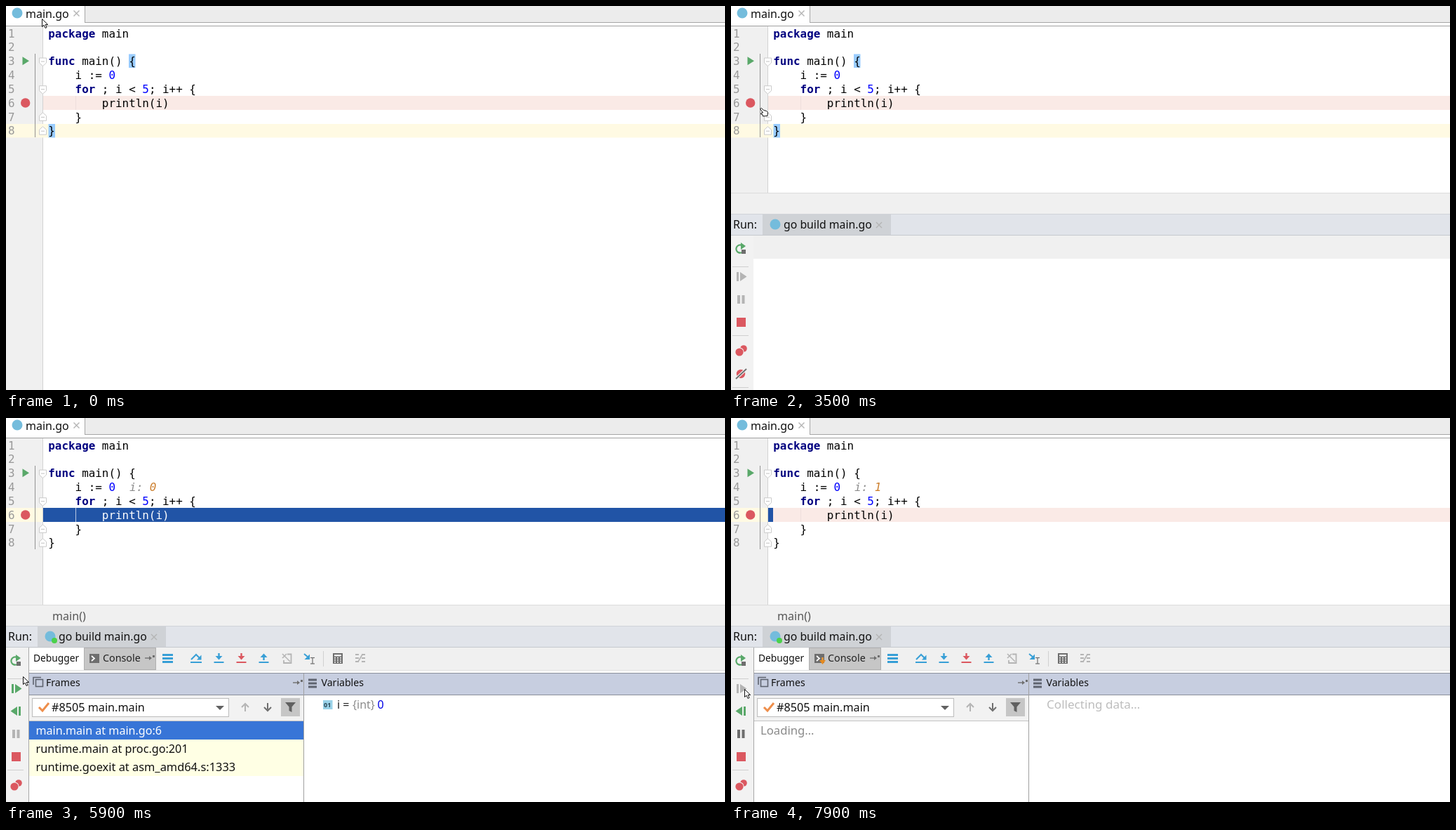
These frames come from a looping animation (1025x547 px, 8000 ms). An HTML page with a canvas:

```html
<!DOCTYPE html>
<html lang="en">
<head>
<meta charset="utf-8">
<title>Debugging session</title>
<style>
html, body { margin: 0; width: 100%; height: 100%; overflow: hidden; background: #fff; }
canvas { display: block; width: 1025px; height: 547px; }
</style>
</head>
<body>
<canvas id="stage" width="1025" height="547"></canvas>
<script>
const g = document.getElementById('stage').getContext('2d');
const LOOP = 8000, W = 1025, H = 547;
const UI = '"Noto Sans", "Open Sans", sans-serif';
const MONO = '"DejaVu Sans Mono", monospace';
const CODE = 15.9, ADV = CODE * 0.602, ROW = 19.83;
const GREEN = '#59a869', RED = '#db5860', BLUE = '#389fd6', GREY = '#b4b4b4', DARK = '#6e6e6e';
const LOGO = '#74bcdc';

function rect(x, y, w, h, c) { g.fillStyle = c; g.fillRect(x, y, w, h); }
function trace(pts) {
  g.beginPath();
  pts.forEach(([x, y], i) => i ? g.lineTo(x, y) : g.moveTo(x, y));
}
function poly(pts, c, edge) {
  trace(pts);
  g.closePath();
  g.fillStyle = c;
  g.fill();
  if (edge) { g.strokeStyle = edge; g.lineWidth = 1; g.stroke(); }
}
function line(pts, c, w = 1) { trace(pts); g.strokeStyle = c; g.lineWidth = w; g.stroke(); }
function box(x, y, w, h, c, lw = 1) { g.strokeStyle = c; g.lineWidth = lw; g.strokeRect(x, y, w, h); }
function disc(x, y, r, c) { g.fillStyle = c; g.beginPath(); g.arc(x, y, r, 0, 7); g.fill(); }
function text(s, x, y, size = 16, c = '#111', font = UI, style = '') {
  g.font = `${style} ${size}px ${font}`;
  g.fillStyle = c;
  g.fillText(s, x, y);
}
function code(s, col, row, c = '#000', style = '') {
  text(s, 60.3 + col * ADV, 44.6 + row * ROW, CODE, c, MONO, style);
}
function close(x, y) {
  line([[x - 4, y - 4], [x + 4, y + 4]], '#b5b5b5', 1.4);
  line([[x + 4, y - 4], [x - 4, y + 4]], '#b5b5b5', 1.4);
}
function play(x, y, w, h, c) { poly([[x, y - h], [x + w, y], [x, y + h]], c); }

function stateAt(t) {
  const running = (t >= 6800 && t < 7100) || t >= 7900;
  const pressed = (t >= 6600 && t < 6800) || (t >= 7700 && t < 7900);
  return {
    popup: t >= 2000 && t < 3100, chosen: t >= 2800,
    panel: t >= 3500, ready: t >= 3700,
    session: t >= 3900, frames: t >= 4100, vars: t >= 4300,
    running, pressed, hover: t >= 6100 && !running,
    output: t >= 6800, value: t >= 7300 ? 1 : 0, loading: t >= 7900
  };
}

function drawTabs() {
  rect(0, 0, W, H, '#fff');
  rect(113, 0, W - 113, 23, '#ececec');
  rect(113, 23, W - 113, 1, '#a6a6a6');
  rect(112, 0, 1, 24, '#a6a6a6');
  rect(0, 28, W, 1, '#a0a0a0');
  disc(16, 10, 7.5, LOGO);
  text('main.go', 28, 17, 16);
  close(100.5, 10.5);
}

function foldMark(row, up) {
  const y = 39.4 + row * ROW, d = up ? -1 : 1;
  poly([[47.5, y - 5 * d], [57.5, y - 5 * d], [57.5, y + 2 * d], [52.5, y + 6.5 * d], [47.5, y + 2 * d]], '#fff', '#cacaca');
  line([[50, y], [55, y]], '#c0c0c0');
}

function drawEditor(s) {
  const key = '#000080', num = '#0000ff';
  const blue = s.session && !s.running;
  rect(0, 29, 52, H - 29, '#f0f0f0');
  rect(52, 29, 1, H - 29, '#d2d2d2');
  if (s.session) rect(0, 128, 52, 20, '#fffae3');
  else rect(0, 168, W, 19.5, '#fffae3');
  rect(53, 128, W - 53, 20, blue ? '#2154a6' : '#faeae6');
  if (s.loading) rect(53, 128, 7, 20, '#2154a6');
  rect(99, 128, 1, 20, blue ? '#b9c8e2' : '#efdfdc');
  if (!s.session) {
    rect(175, 68.5, 9.5, 19.5, '#99ccff');
    rect(60.5, 168, 9.5, 19.5, '#99ccff');
  }
  for (let i = 0; i < 8; i++) text(i + 1, 3, 44.6 + i * ROW, CODE, '#999', MONO);
  rect(41, 68, 1, 119, '#929292');
  foldMark(2); foldMark(4); foldMark(6, true); foldMark(7, true);
  play(23.5, 78.3, 9.5, 6, GREEN);
  disc(27.7, 138, 6.7, RED);

  code('package', 0, 0, key, 'bold');
  code('main', 8, 0);
  code('func', 0, 2, key, 'bold');
  code('main() {', 5, 2);
  code('i :=', 4, 3);
  code('0', 9, 3, num);
  code('for', 4, 4, key, 'bold');
  code('; i <', 8, 4);
  code('5', 14, 4, num);
  code('; i++ {', 15, 4);
  code('println(i)', 8, 5, blue ? '#fff' : '#000');
  code('}', 4, 6);
  code('}', 0, 7);
  if (s.vars) {
    code('i:', 12.1, 3, '#8c8c8c', 'italic');
    code(s.value, 15.1, 3, '#cc7f2e', 'italic');
  }
}

function bug(x, y) {
  for (const dy of [-4, 0, 4]) line([[x - 7, y + dy], [x + 7, y + dy]], GREEN, 2);
  line([[x - 3, y - 7], [x, y - 3], [x + 3, y - 7]], GREEN, 1.6);
  g.fillStyle = GREEN;
  g.beginPath();
  g.ellipse(x, y + 0.5, 4.8, 6.5, 0, 0, 7);
  g.fill();
  line([[x - 3, y - 1], [x + 3, y - 1]], '#e6f0e8', 1);
  line([[x - 3, y + 2], [x + 3, y + 2]], '#e6f0e8', 1);
}

function drawPopup(s) {
  const ink = s.chosen ? '#fff' : '#111';
  rect(26, 81, 366, 81, '#f2f2f2');
  box(25.5, 80.5, 366, 81, '#bdbdbd');
  if (s.chosen) rect(26, 108, 365, 27, '#3875d7');
  play(34.5, 94.5, 12.5, 6.8, GREEN);
  bug(40, 121.5);
  bug(39.5, 148);
  disc(45, 153, 4.5, '#5e5e5e');
  text("Run 'go build main.go'", 53.5, 100.3, 16.2);
  text("Debug 'go build main.go'", 53.5, 126.8, 16.2, ink);
  text("Record and Debug 'go build main.go'", 53.5, 153.5, 16.2);
  rect(64, 102, 9, 1, '#111');
  rect(54, 128, 11, 1, ink);
  text('Ctrl+Shift+F10', 268, 100.3, 17, '#4a4a4a');
  text('Ctrl+Shift+F11', 268, 126.8, 17, s.chosen ? '#fff' : '#4a4a4a');
}

function dock(x, y) {
  line([[x - 6, y], [x + 1, y]], DARK, 1.4);
  poly([[x, y - 3], [x + 4, y], [x, y + 3]], DARK);
  rect(x + 5, y - 4, 3, 3, DARK);
}
function bars(x, y, c, w = 14) {
  for (const dy of [-6, -1, 4]) rect(x, y + dy, w, 3, c);
}
function arrow(x, y, c, d) {
  line([[x, y - 6 * d], [x, y + 3 * d]], c, 2);
  line([[x - 5, y], [x, y + 5 * d], [x + 5, y]], c, 2);
}
function step(x, c, d) {
  const y = d > 0 ? 339 : 341;
  line([[x, y - 4 * d], [x, y + 2 * d]], c, 2.4);
  poly([[x - 5, y], [x + 5, y], [x, y + 5.5 * d]], c);
  rect(x - 7, 347, 14, 2, c);
}

function drawToolbar(s) {
  const on = s.session, blue = on ? BLUE : GREY, dim = on ? DARK : GREY;
  bars(223, 342, blue, 15);
  line([[264, 344], [271, 337], [276, 342]], blue, 2);
  poly([[278.5, 337.5], [278.5, 344.5], [272, 344.5]], blue);
  rect(263, 347, 16, 2, blue);
  step(303.5, blue, 1);
  step(335.5, on ? RED : GREY, 1);
  step(367.5, blue, -1);
  line([[394, 336], [400, 342]], GREY, 1.6);
  line([[400, 336], [394, 342]], GREY, 1.6);
  line([[401, 336.5], [406.5, 336.5], [406.5, 349], [396, 349], [396, 345]], GREY, 1.8);
  line([[400, 342], [405, 347]], GREY, 1.4);
  line([[425, 336], [431, 341]], blue, 2);
  poly([[433, 336.5], [433, 344], [425.5, 344]], blue);
  line([[434, 341.5], [440, 341.5]], dim, 1.2);
  line([[437, 342], [437, 350]], dim, 1.2);
  line([[434, 350], [440, 350]], dim, 1.2);
  rect(452, 332, 1, 22, '#d0d0d0');
  rect(466, 335, 14, 15, dim);
  rect(468, 337, 10, 2.5, '#f0f0f0');
  for (let i = 0; i < 9; i++) rect(468 + i % 3 * 4, 341 + (i / 3 | 0) * 3, 2, 1.6, '#f0f0f0');
  for (let i = 0; i < 3; i++) {
    line([[498, 337 + i * 5], [503, 337 + i * 5]], GREY, 2);
    line([[507, 337 + i * 5], [512, 337 + i * 5]], GREY, 2);
  }
  line([[502, 347], [508, 337]], GREY, 1.6);
}

function pause(y, c) { rect(9, y - 6, 4, 12, c); rect(15.5, y - 6, 4, 12, c); }

function drawSide(s) {
  rect(0, 327, 32, H - 327, '#f2f2f2');
  if (s.hover) {
    rect(2, 372, 26, 28, s.pressed ? '#cfcfcf' : '#e0e0e0');
  }
  g.strokeStyle = GREEN;
  g.lineWidth = 2.2;
  g.beginPath();
  g.arc(13, 346, 5.6, 1.2, 5.3);
  g.stroke();
  poly([[14, 337], [21, 342], [14, 347]], GREEN);
  rect(15, 347, 6, 6, DARK);
  rect(2, 371, 23, 1, '#cfcfcf');

  const go = s.session && !s.running ? GREEN : GREY;
  const shift = s.session ? 32 : 0;
  rect(8, 379, 3, 13, go);
  play(13, 385.5, 9.5, 6.5, go);
  if (s.session) {
    poly([[16, 411], [16, 424], [6.5, 417.5]], GREEN);
    rect(18, 411, 3, 13, GREEN);
  }
  pause(418 + shift, s.running ? DARK : GREY);
  rect(8, 444 + shift, 13, 13, RED);
  rect(2, 469 + shift, 23, 1, '#cfcfcf');
  disc(18, 488 + shift, 4.8, RED);
  disc(12, 493 + shift, 6.6, '#f2f2f2');
  disc(12, 493 + shift, 5.6, RED);
  if (!s.session) {
    disc(14, 524, 6.2, RED);
    line([[7, 531], [22, 517]], '#f2f2f2', 4);
    line([[7, 531], [22, 517]], DARK, 1.8);
    rect(2, 543, 23, 1, '#cfcfcf');
  }
}

function drawFrames(s) {
  rect(33, 395, 391, 36, '#f2f2f2');
  rect(33, 431, 391, 1, '#c4c4c4');
  rect(424, 364, 1, H - 364, '#a0a0a0');
  box(42.5, 372.5, 10, 10, '#5f6470', 1.6);
  line([[39, 380], [39, 369.5], [50, 369.5]], '#5f6470', 1.6);
  text('Frames', 57, 382, 14.1);
  dock(415, 377);
  rect(37, 399, 281, 27, '#fff');
  box(37.5, 399.5, 280, 26, '#bcbcbc');
  line([[47, 412], [52, 417], [61, 406]], '#ee8e4b', 3);
  text('#8505 main.main', 65, 418, 16.2);
  poly([[299, 410], [311, 410], [305, 416]], '#616161');
  arrow(341, 412, GREY, -1);
  arrow(373, 412, DARK, 1);
  rect(392, 399, 27, 26, '#c6c6c6');
  poly([[398, 405], [413, 405], [407.5, 411.5], [407.5, 419], [403.5, 417], [403.5, 411.5]], '#606060');
  if (s.loading) {
    text('Loading…', 42, 451, 16.7, '#8a8a8a');
    return;
  }
  rect(33, 432, 391, 26, '#3875d7');
  rect(33, 458, 391, 52, '#ffffe4');
  text('main.main at main.go:6', 42.5, 451, 16.1, '#fff');
  text('runtime.main at proc.go:201', 42.5, 477, 16.2);
  text('runtime.goexit at asm_amd64.s:1333', 42.5, 503, 16.4);
}

function drawVars(s) {
  const x = s.frames ? 431 : 72;
  bars(x, 377.5, '#5f6470', 12);
  text('Variables', x + 18.5, 382, 14.1);
  if (!s.vars) return;
  if (s.loading) {
    text('Collecting data…', 450, 414, 17.1, '#bdbdbd');
    return;
  }
  rect(452, 402, 13.5, 13, '#9ad2e8');
  text('01', 453, 412, 9, '#2b4654', UI, 'bold');
  text('i =', 472, 414, 16, '#222');
  text('{int}', 494, 414, 16, '#8c8c8c');
  text(s.value, 529.5, 414, 16, '#0000e6');
}

function drawPanel(s) {
  rect(0, 267, W, 30, '#f0f0f0');
  rect(0, 266, W, 1, '#dcdcdc');
  rect(0, 296, W, 1, '#d0d3d8');
  if (s.session) text('main()', 66, 288, 16.1, '#555');
  rect(0, 297, W, 30, '#e1e4ea');
  rect(45, 297, 183, 29, '#cfd2d6');
  text('Run:', 3, 317, 16);
  disc(63, 311, 7.5, LOGO);
  if (s.ready) disc(69, 317, 4, '#4bd14b');
  text('go build main.go', 75, 317, 15.8);
  close(211, 312);
  rect(0, 326, W, 1, '#c6c9ce');
  rect(0, 327, W, 33, '#f0f0f0');
  rect(0, 360, W, H - 360, '#fff');
  drawSide(s);
  if (!s.ready) return;

  rect(33, 328, 78, 31, '#fff');
  text('Debugger', 39, 347, 13.8);
  rect(111, 327, 103, 32, '#c6c6c6');
  box(111.5, 327.5, 102, 31, '#b0b0b0');
  rect(119, 336, 14, 13, DARK);
  line([[122, 339], [126, 342.5], [122, 346]], '#fff', 1.7);
  if (s.output) {
    line([[130.5, 341], [130.5, 347]], '#ef9b34', 2.4);
    poly([[126, 345], [135, 345], [130.5, 351]], '#e58a1f');
  }
  text('Console', 138, 347, 14.3, '#222');
  dock(204, 342);
  drawToolbar(s);
  rect(33, 359, W - 33, 1, '#dedede');
  rect(32, 363, W - 32, 31, '#c7cee0');
  rect(32, 363, W - 32, 1, '#8b909b');
  rect(32, 394, W - 32, 1, '#8b909b');
  rect(32, 327, 1, H - 327, '#a8a8a8');
  if (s.frames) {
    drawFrames(s);
  } else {
    rect(33, 395, 33, 35, '#f2f2f2');
    rect(33, 430, 33, 1, '#c4c4c4');
    rect(66, 364, 1, H - 364, '#a0a0a0');
    line([[48, 369.5], [39, 369.5], [39, 383], [42, 383]], '#5f6470', 1.8);
    line([[48, 373], [43, 373], [43, 381]], '#5f6470', 1.6);
    dock(56, 377);
    arrow(46, 412, GREY, 1);
  }
  drawVars(s);
}

// Pointer stops: time, x, y, shape (1 = hand)
const stops = [
  [1200, 28, 78, 1], [1400, 26, 78, 1], [1700, 22, 79, 1], [2000, 26, 80, 0],
  [2800, 41, 124, 0], [2900, 41, 126, 0], [3000, 42, 128, 0], [3100, 41, 132, 1],
  [3500, 41, 145, 1], [4700, 80, 220, 0], [4900, 125, 334, 0], [5200, 75, 217, 0],
  [5400, 35, 315, 0], [5700, 30, 340, 0], [5900, 24, 368, 0], [6100, 19, 386, 0]
];
function pointerAt(t) {
  const q = Math.floor(t / 100) * 100;
  if (q < 1200) {
    const p = q / 1100;
    return [51 - 21 * p, 18 + 55 * p, q >= 1000];
  }
  const i = stops.findLastIndex(k => k[0] <= q);
  const a = stops[i], b = stops[i + 1];
  if (q >= 1700) return a.slice(1);
  const p = (q - a[0]) / (b[0] - a[0]);
  return [a[1] + (b[1] - a[1]) * p, a[2] + (b[2] - a[2]) * p, 1];
}
function drawPointer(t) {
  const [x, y, hand] = pointerAt(t);
  g.save();
  g.translate(Math.round(x) + 0.5, Math.round(y) + 0.5);
  g.lineJoin = 'round';
  if (hand) {
    poly([[0, 1], [2, 0], [5, 3], [9, 4], [11, 6], [10.5, 11], [4, 11.5], [3.5, 9],
      [1, 8.5], [1.5, 7], [4, 6.5]], '#fff', '#111');
  } else {
    poly([[0, 0], [0, 11], [2.6, 8.7], [4.6, 13], [6.6, 12], [4.7, 8], [8.2, 8]], '#fff', '#111');
  }
  g.restore();
}

function draw(t) {
  const s = stateAt(t);
  drawTabs();
  drawEditor(s);
  if (s.panel) drawPanel(s);
  if (s.popup) drawPopup(s);
  drawPointer(t);
}

const start = performance.now();
function tick() {
  draw((performance.now() - start) % LOOP);
  requestAnimationFrame(tick);
}
tick();
</script>
</body>
</html>
```
